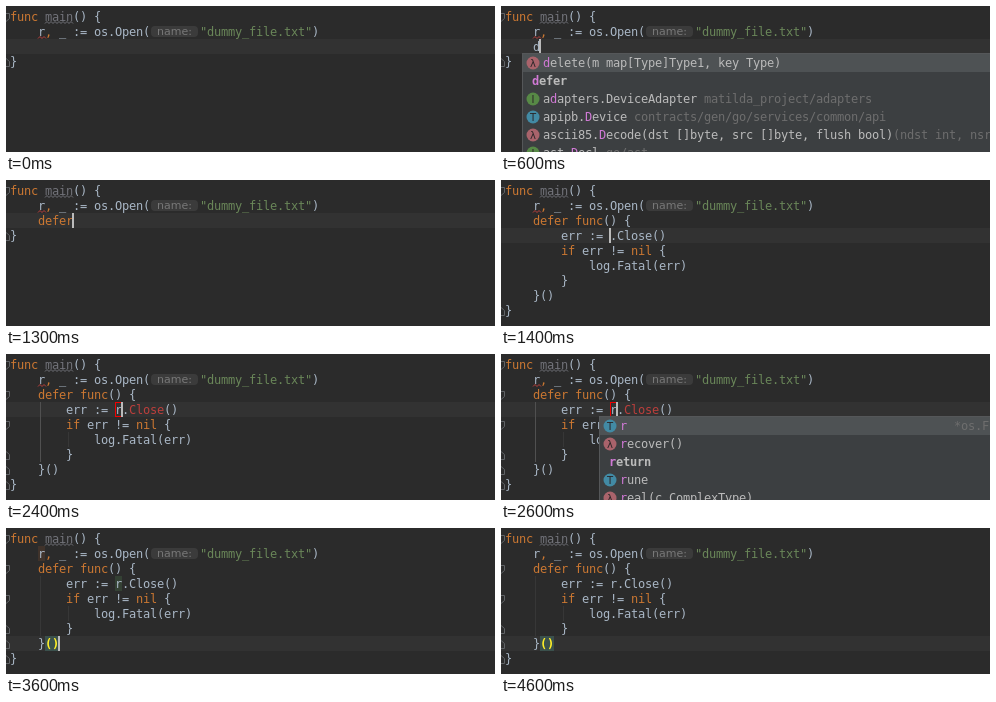
An HTML page with a canvas for the animation above (5100 ms loop, 489 by 146 pixels).

```html
<!DOCTYPE html>
<html lang="en">
<head>
<meta charset="utf-8">
<title>Go editor: completing a deferred close</title>
<style>
html, body { margin: 0; width: 100%; height: 100%; overflow: hidden; background: #2b2b2b; }
canvas { display: block; }
</style>
</head>
<body>
<canvas id="stage" width="489" height="146"></canvas>
<script>
const LOOP = 5100, CELL = 7, ROW = 15, LEFT = 4, ITEM = 18;
const MONO = '12px "DejaVu Sans Mono", monospace';
const SANS = '"DejaVu Sans", sans-serif';
const INK = '#a9b7c6', KEY = '#cc7832', STR = '#6a8759', RED = '#bc3f3c', GREY = '#72737a';
const DIM = '#6e6e6e', MATCH = '#d17ad6';
const ICONS = { 'λ': '#a9636b', I: '#578946', T: '#428aa4' };

const g = document.getElementById('stage').getContext('2d');
const rowY = row => 3 + ROW * row;
const colX = n => LEFT + CELL * n;

function box(x, y, w, h, color) {
  g.fillStyle = color;
  g.fillRect(x, y, w, h);
}

// Monospaced text on the 7px grid; returns the x after the last character.
function put(s, x, y, color, bold) {
  g.font = (bold ? 'bold ' : '') + MONO;
  g.fillStyle = color;
  for (const c of s) {
    if (c !== ' ') g.fillText(c, x, y);
    x += CELL;
  }
  return x;
}

function code(s, x, row) {
  for (const part of s.match(/"[^"]*"|\w+|,|[^\w",]+/g)) {
    const color = part[0] === '"' ? STR
      : /^(func|defer|if|nil|,)$/.test(part) ? KEY
      : part === 'main' ? GREY : INK;
    x = put(part, x, rowY(row) + 12, color);
  }
  return x;
}

function line(color, ...pts) {
  g.strokeStyle = color;
  g.lineWidth = 1;
  g.beginPath();
  for (const [x, y] of pts) g.lineTo(x, y);
  g.stroke();
}

function wave(x, end, row, color) {
  const pts = [];
  for (let i = 0; x + 2 * i <= end; i++) pts.push([x + 2 * i, rowY(row) + (i % 2 ? 12.5 : 14.5)]);
  line(color, ...pts);
}

function fold(row, closing) {
  const y = rowY(row) + 4.5;
  if (closing) line('#606366', [0, y], [3.5, y + 3], [3.5, y + 8], [0, y + 8]);
  else line('#606366', [0, y], [3.5, y], [3.5, y + 5], [0, y + 8]);
}

function caret(n, row) {
  box(colX(n) - 1, rowY(row), 2, ROW, '#bbbbbb');
}

function icon(kind, x, y) {
  g.fillStyle = ICONS[kind];
  g.beginPath();
  g.arc(x, y, 6.5, 0, 7);
  g.fill();
  g.font = '10px ' + SANS;
  g.fillStyle = '#2b2628';
  g.textAlign = 'center';
  g.fillText(kind, x, y + 3.5);
  g.textAlign = 'left';
}

// Each item: [icon, label, package, type at the right].
function popup(items, prefix, x, row) {
  const y0 = rowY(row + 1);
  box(x, y0 - 1, 489, items.length * ITEM + 2, '#555759');
  box(x + 1, y0, 489, items.length * ITEM, '#3c3f41');
  box(x + 1, y0, 489, ITEM, '#4e5254');
  items.forEach(([kind, label, place = '', type = ''], i) => {
    const y = y0 + ITEM * i, base = y + 13;
    if (kind) icon(kind, x + 11, y + 9);
    const at = label.toLowerCase().indexOf(prefix);
    const end = at + prefix.length;
    let tx = x + (kind ? 21 : 10);
    tx = put(label.slice(0, at), tx, base, '#bbbbbb', !kind);
    tx = put(label.slice(at, end), tx, base, MATCH, !kind);
    tx = put(label.slice(end), tx, base, '#bbbbbb', !kind);
    g.save();
    g.beginPath();
    g.rect(0, y, type ? 445 : 489, ITEM);
    g.clip();
    put(place, tx + (place[0] === '(' ? 0 : CELL), base, DIM);
    g.restore();
    put(type, 453, base, DIM);
  });
}

const plugin = 'protobuf/plugin/defaultcheck';
const LIST_D = [
  ['λ', 'delete(m map[Type]Type1, key Type)'],
  ['', 'defer'],
  ['I', 'adapters.DeviceAdapter', 'matilda_project/adapters'],
  ['T', 'apipb.Device', 'contracts/gen/go/services/common/api'],
  ['λ', 'ascii85.Decode(dst []byte, src []byte, flush bool)', '(ndst int, nsrc int, err error)'],
  ['I', 'ast.Decl', 'go/ast']
];
const LIST_DEF = [
  ['λ', 'defaultcheck.NewPlugin()', plugin, '*plugin'],
  ['λ', 'defaultcheck.NewPlugin()', 'github.com/gogo/' + plugin, '*plugin'],
  ...['T', 'U', 'V1', 'V2'].map(n =>
    ['T', 'definition.' + n, 'golang.org/x/tools/cmd/guru/testdata/src/definition'])
];
const LIST_R = [
  ['T', 'r', '', '*os.F'],
  ['λ', 'recover()'],
  ['', 'return'],
  ['T', 'rune'],
  ['λ', 'real(c ComplexType)']
];

function header(t) {
  code('func main() {', LEFT, 0);
  wave(39, 67, 0, GREY);
  fold(0);
  if (t >= 3200 && t < 3900) box(colX(4), rowY(1), CELL, ROW, '#40332b');
  const x = code('r, _ := os.Open(', colX(4), 1);
  if (t < 3200) wave(32, 40, 1, RED);
  g.fillStyle = '#3b3b3b';
  g.beginPath();
  g.roundRect(x + 1, rowY(1) + 2, 47, 11, 4);
  g.fill();
  g.font = '11px ' + SANS;
  g.fillStyle = '#787878';
  g.fillText('name:', x + 7, rowY(1) + 11);
  code('"dummy_file.txt")', x + 50, 1);
}

function typing(t) {
  box(0, rowY(2), 489, ROW, '#323232');
  header(t);
  code('}', LEFT, 3);
  fold(3, true);
  const word = 'defer'.slice(0, [500, 700, 1100, 1200, 1300].filter(k => t >= k).length);
  if (word) code(word, colX(4), 2);
  if (t >= 100) caret(4 + word.length, 2);
  if (t < 600 || t >= 1300) return;
  if (t >= 1200) popup([['', 'defer']], word, 21, 2);
  else if (t >= 1100) popup(LIST_DEF, word, 21, 2);
  else popup(LIST_D, t < 800 ? 'd' : 'de', 21, 2);
}

function expanded(t) {
  const done = t >= 3600, named = t >= 2400, checked = t >= 1700;
  box(0, rowY(done ? 7 : 3), 489, ROW, '#323232');
  if (checked) {
    box(34, rowY(3), 1, 4 * ROW, done ? '#373737' : '#505050');
    box(62, rowY(5), 1, ROW, '#373737');
    fold(2);
    fold(4);
    fold(6, true);
    fold(7, true);
  }
  header(t);
  code('defer func() {', colX(4), 2);
  if (t >= 3200 && t < 3900) box(colX(15), rowY(3), CELL, ROW, '#344134');
  let x = code('err := ' + (named ? 'r.' : '.'), colX(8), 3);
  x = put('Close', x, rowY(3) + 12, checked && t < 3200 ? RED : INK);
  code('()', x, 3);
  code('if err != nil {', colX(8), 4);
  code('log.Fatal(err)', colX(12), 5);
  code('}', colX(8), 6);
  code('}', colX(4), 7);
  if (done) {
    box(colX(5), rowY(7), 2 * CELL, ROW, '#3b514d');
    put('()', colX(5), rowY(7) + 12, '#ffef28', true);
  } else code('()', colX(5), 7);
  code('}', LEFT, 8);
  fold(8, true);
  if (named && !done) {
    g.strokeStyle = '#f00000';
    g.strokeRect(109.5, rowY(3) + .5, 7, ROW - 1);
  }
  if (!done) caret(named ? 16 : 15, 3);
  else if (t < 4600) caret(7, 7);
  if (t >= 2600 && t < 2900) popup(LIST_R, 'r', 98, 3);
}

function draw(now) {
  const t = now % LOOP;
  box(0, 0, 489, 146, '#2b2b2b');
  (t < 1400 ? typing : expanded)(t);
}

const start = performance.now();
function tick() {
  draw(performance.now() - start);
  requestAnimationFrame(tick);
}
tick();
</script>
</body>
</html>
```
